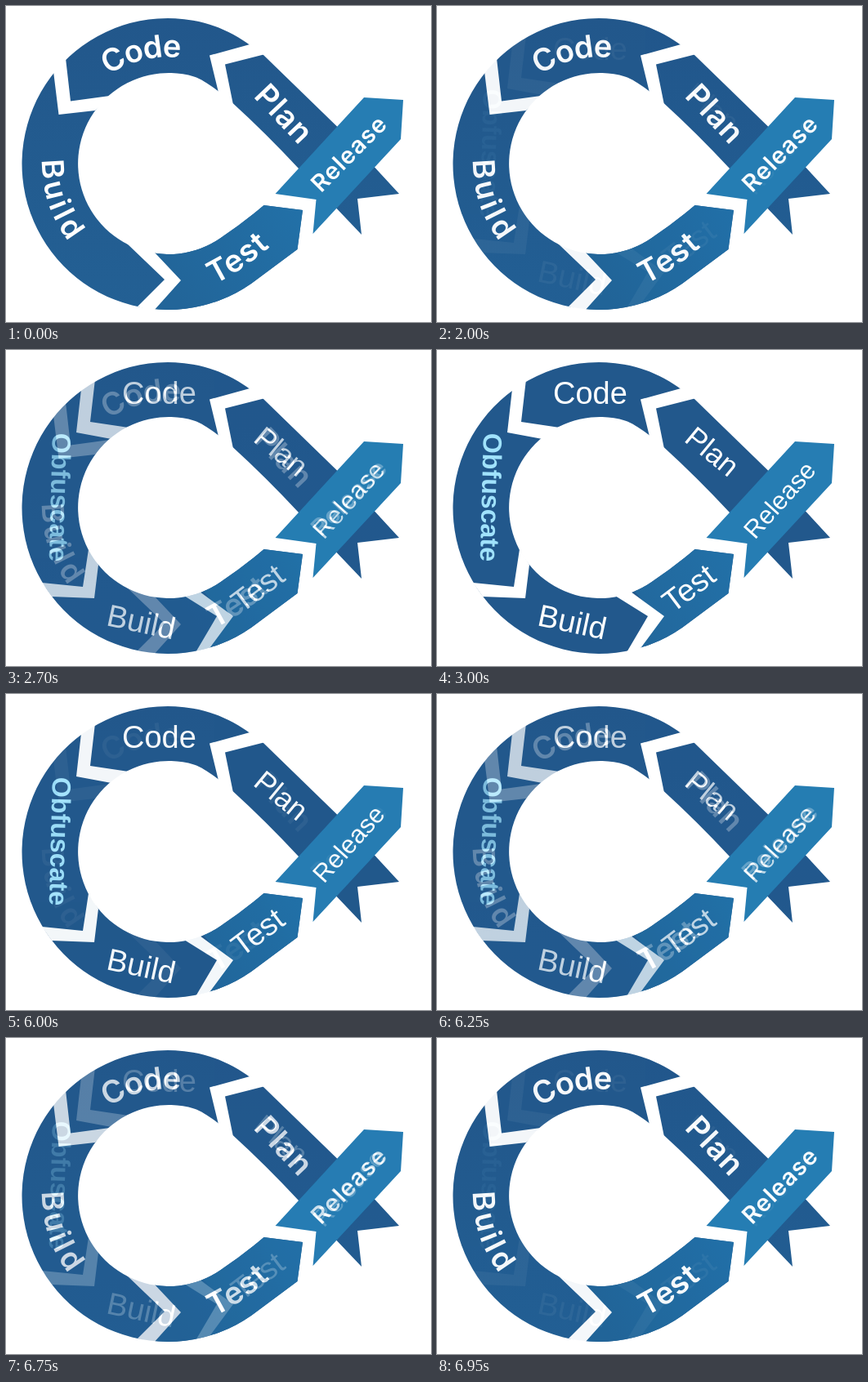
Animation, 520 px wide and 387 px high, one loop 7 s. Source, as an HTML page:

```html
<!DOCTYPE html>
<html lang="en">
<head>
<meta charset="utf-8">
<title>Delivery loop</title>
<style>
  html, body { margin: 0; width: 100%; height: 100%; overflow: hidden; background: #fff; }
  svg { display: block; width: 100%; height: 100%; }
  text { fill: #fff; }
  .gap { fill: #fff; }
  .spaced { font: 600 38px Inter, sans-serif; }
  .plain { font: 38px "Liberation Sans", Arial, sans-serif; }
  .added { font-weight: 700; font-size: 32.2px; fill: #a0e2fc; }

  #longer { opacity: 0; animation: crossfade 7s infinite; }
  @keyframes crossfade {
    0% { opacity: 0; animation-timing-function: steps(1, jump-end); }
    28.571% { opacity: 0; animation-timing-function: steps(21, jump-start); }
    43.571% { opacity: 1; animation-timing-function: linear; }
    85.714% { opacity: 1; animation-timing-function: steps(20, jump-start); }
    100% { opacity: .0476; }
  }
</style>
</head>
<body>
<svg viewBox="0 0 520 387">
  <defs>
    <path id="ribbon" d="M481 230 L405.5 148 L315 60 L300 49 C280 34 255 22 229 17.7
      A178.5 178.5 0 1 0 300.4 339.7 L356.5 298 L363 250 L315.5 244
      Q291 265 262.7 284 A111 111 0 1 1 230 86.4
      C244 91 261 105 278 119.5 Q318 156 358 199 L435 280 L430 236 Z"/>
    <clipPath id="inRibbon"><use href="#ribbon"/></clipPath>
    <linearGradient id="blueShort" x2="0" y2="1">
      <stop stop-color="#22578b"/>
      <stop offset="1" stop-color="#236094"/>
    </linearGradient>
    <linearGradient id="testBlue" gradientUnits="userSpaceOnUse" x1="205" y1="350" x2="362" y2="260">
      <stop stop-color="#226599"/>
      <stop offset="1" stop-color="#2270a7"/>
    </linearGradient>
    <path id="planGap" class="gap" d="M302 46 L249 60.5 L260 106 L278 121 L268 71.5 L317 59 Z"/>
    <path id="release" fill="#267db3" d="M329.5 230 L403 150 L438 112 L486 115 L483 163 L375.5 279 L379.5 237 Z"/>
    <path id="codeArc" d="M-131 0 A131 131 0 0 1 131 0"/>
    <path id="buildArc" d="M-154 0 A154 154 0 0 0 0 154"/>
    <path id="testArc" d="M255 341 Q294 322 336 283"/>
  </defs>

  <g id="shorter">
    <use href="#ribbon" fill="url(#blueShort)"/>
    <path clip-path="url(#inRibbon)" fill="url(#testBlue)" d="M178 300 L205 336 L172 380 H365 V240 H260 Z"/>
    <use href="#planGap"/>
    <path class="gap" d="M58 80 L64.5 133 L109 128 L127 110 L79 116.5 L73 64 Z"/>
    <path class="gap" d="M146 289 L194 335 L161 368 L180 374 L214 336 L182 302 Z"/>
    <use href="#release"/>
    <g class="spaced">
      <text transform="translate(198 193.5) rotate(-13.7)" text-anchor="middle" letter-spacing="-1.4"><textPath href="#codeArc" startOffset="50%">Code</textPath></text>
      <text transform="translate(198 193.5) rotate(2)" letter-spacing="4.4" style="font-size:37px"><textPath href="#buildArc">Build</textPath></text>
      <text letter-spacing="1.2"><textPath href="#testArc">Test</textPath></text>
      <text transform="translate(302 111) rotate(46.5)" letter-spacing="1">Plan</text>
      <text transform="translate(385.5 229.5) rotate(-45.2)" style="font-size:29px" letter-spacing="1">Release</text>
    </g>
  </g>

  <g id="longer">
    <rect width="520" height="387" fill="#fff"/>
    <use href="#ribbon" fill="#22588c"/>
    <path clip-path="url(#inRibbon)" fill="url(#testBlue)" d="M237 290 L268 326 L240 380 H365 V240 H260 Z"/>
    <use href="#planGap"/>
    <path class="gap" d="M92 48 L86 101 L129 109 L150 95 L103 88 L109 36 Z"/>
    <path class="gap" d="M44 285 L94 290 L101 244 L113 263 L108 304 L56 302 Z"/>
    <path class="gap" d="M218 301 L258 326 L231 372 L247 368 L278 326 L237 296 Z"/>
    <use href="#release"/>
    <g class="plain">
      <text x="142" y="66">Code</text>
      <text class="added" transform="translate(57 101.5) rotate(91.5)">Obfuscate</text>
      <text transform="translate(121.5 337) rotate(12)">Build</text>
      <text transform="translate(288 323) rotate(-37)">Test</text>
      <text transform="translate(301 111) rotate(39.5)" style="font-size:36px">Plan</text>
      <text transform="translate(389 233) rotate(-48)" style="font-size:31px">Release</text>
    </g>
  </g>
</svg>
</body>
</html>
```
